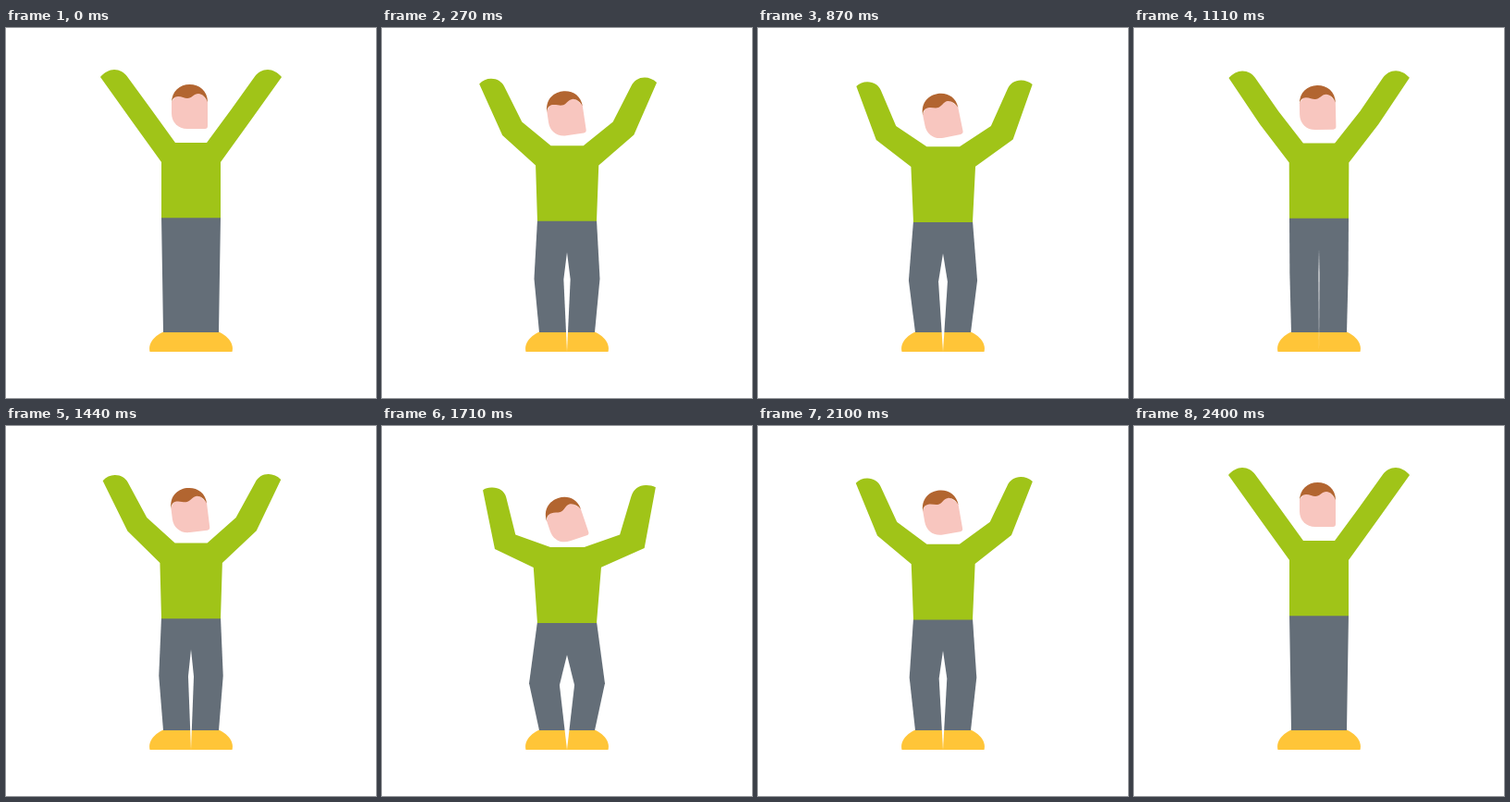
An HTML page that plays this animation: 400x400 px, repeating every 3930 ms.

```html
<!DOCTYPE html>
<html lang="en">
<head>
<meta charset="utf-8">
<title>Cheering figure</title>
<style>
  html, body { margin: 0; width: 100%; height: 100%; overflow: hidden; background: #fff; }
  svg { display: block; width: 100%; height: 100%; }
</style>
</head>
<body>
<svg viewBox="0 0 400 400">
  <path fill="#ffc538" d="M170 328.5H230C238 332 247 340 244.5 350H155.5C153 340 162 332 170 328.5Z"/>
  <path id="legs" fill="#646e78"/>
  <path id="gap" fill="#fff"/>
  <path id="shirt" fill="#a0c418"/>
  <g id="head">
    <path fill="#f8c6bf" d="M179 80L186 70H210L218 79V106Q218 109 215 109H196C186 109 179 102 179 92Z"/>
    <path fill="#b26530" d="M179 81C179 68 188 61 198.5 61C209 61 218 68 218 80C216 75 212 71 208 71C203 71 201 76 196 76C193 76 190 74 186 74C182 74 179.5 77 179 81Z"/>
  </g>
</svg>
<script>
const LOOP = 3930, DANCE = 2400, BOUNCE = 1200, STEP = 30;

// Each part: path with arms stretched, path in the deepest crouch.
const parts = {
  legs: [
    'M168 204L232 204L231 265L230 329L170 329L169 265Z',
    'M168 212L232 212L241.6 279L230 329L170 329L158.4 279Z'
  ],
  gap: [
    'M200 238L200 265L200 350L200 265Z',
    'M200 248L208.6 281L200 350L191.4 281Z'
  ],
  shirt: [
    'M102 53C106 48 112 45 117 45C123 45 127.5 48 130.7 52L157 88L183 124L217 124L243.5 88' +
    'L269.3 52C272.5 48 277 45 283 45C288 45 294 48 298 53L263 102L232 145L232 205.3L168 205.3L168 145L137 102Z',
    'M109.5 70.5C112 68.5 115.5 67.8 119.5 68C126.5 68 133 72 134.5 79L143.5 119.5L182 131.4L218.7 131.4L258 119.5' +
    'L269.3 78C272 69 278 65.2 285 65.2C288.5 65 292.5 65.5 295.7 67L285 134L237.3 153.2L232 213.5L168 213.5L163.5 153.5L121 135Z'
  ]
};

const number = /\d+(\.\d+)?/g;
const byId = id => document.getElementById(id);

function mix([a, b], p) {
  const ends = b.match(number);
  let i = 0;
  return a.replace(number, n => (+n + (ends[i++] - n) * p).toFixed(3));
}

// 0 = stretched, 1 = crouched; eased both ways.
function crouch(t) {
  if (t >= DANCE) return 0;
  const x = 1 - Math.abs((t % BOUNCE) / (BOUNCE / 2) - 1);
  return x * x * (3 - 2 * x);
}

function draw(now) {
  const p = crouch(Math.floor((now % LOOP) / STEP) * STEP);
  for (const id in parts) byId(id).setAttribute('d', mix(parts[id], p));
  byId('head').setAttribute('transform',
    `translate(${-0.5 * p} ${16.8 * p}) rotate(${-20 * p} 198.5 85)`);
}

let start;
function tick(now) {
  start ??= now;
  draw(now - start);
  requestAnimationFrame(tick);
}
draw(0);
requestAnimationFrame(tick);
</script>
</body>
</html>
```
